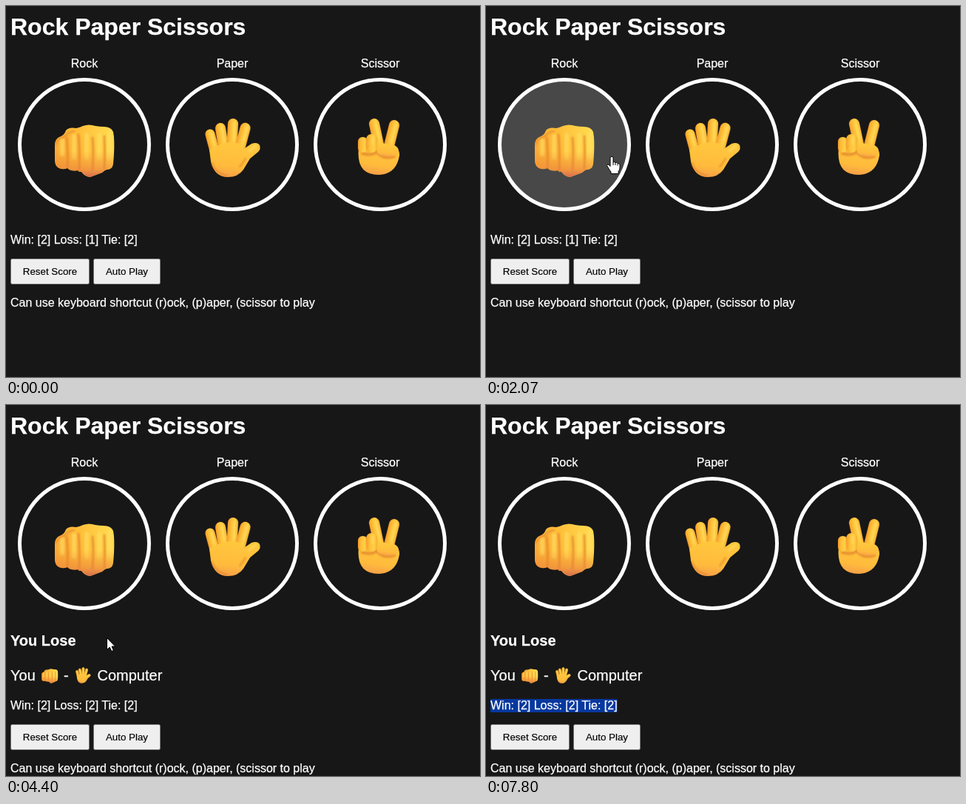
Recreate the animation shown at these times as an HTML page. Size 641 by 501 pixels, loop 8000 ms.

```html
<!DOCTYPE html>
<html lang="en">
<head>
<meta charset="utf-8">
<title>Rock Paper Scissors</title>
<style>
  html, body { margin: 0; width: 100%; height: 100%; overflow: hidden; background: #171717; }
  svg { display: block; width: 641px; height: 501px; font: 16px Arial, "Liberation Sans", sans-serif; }
  text { fill: #fff; stroke: #fff; stroke-width: .25; white-space: pre; }
  .title { font-size: 32px; font-weight: bold; }
  .label { text-anchor: middle; }
  .big { font-size: 20px; }
  .bold { font-weight: bold; }
  .ring { fill: transparent; stroke: #fff; stroke-width: 5; }
  .ring.on { fill: #484848; }
  .button rect { fill: #efefef; stroke: #767676; }
  .button text { fill: #000; stroke: #000; stroke-width: .15; font-size: 13.333px; text-anchor: middle; }
  .finger { fill: url(#finger); stroke: #e98f28; stroke-opacity: .3; stroke-width: .6; }
  .crease { fill: none; stroke: #e07f2c; stroke-linecap: round; stroke-opacity: .7; filter: url(#soft); }
  .shine { fill: none; stroke: #ffe066; stroke-linecap: round; stroke-opacity: .6; filter: url(#soft); }
  .pointer { fill: #fff; stroke: #000; stroke-width: 1; stroke-linejoin: round; }
</style>
</head>
<body>
<svg viewBox="0 0 641 501">
  <defs>
    <linearGradient id="finger">
      <stop offset="0" stop-color="#f6a02c"/>
      <stop offset=".35" stop-color="#ffc03a"/>
      <stop offset=".7" stop-color="#ffd046"/>
      <stop offset="1" stop-color="#f9b233"/>
    </linearGradient>
    <linearGradient id="knuckles" x1="0" y1=".6" x2="1" y2=".4">
      <stop offset="0" stop-color="#f9a936"/>
      <stop offset=".5" stop-color="#ffbf3a"/>
      <stop offset="1" stop-color="#ffda4e"/>
    </linearGradient>
    <linearGradient id="palm" x1=".6" y1="0" x2=".4" y2="1">
      <stop offset="0" stop-color="#ffc83d"/>
      <stop offset=".7" stop-color="#ffbb3c"/>
      <stop offset="1" stop-color="#f6a048"/>
    </linearGradient>
    <linearGradient id="shade" x1="0" y1="0" x2="0" y2="1">
      <stop offset=".5" stop-color="#f08a35" stop-opacity="0"/>
      <stop offset=".85" stop-color="#ea8040" stop-opacity=".6"/>
      <stop offset="1" stop-color="#cf6258" stop-opacity=".9"/>
    </linearGradient>
    <filter id="soft" filterUnits="userSpaceOnUse" x="0" y="100" width="641" height="180">
      <feGaussianBlur stdDeviation="1.2"/>
    </filter>
    <path id="fistShape" d="M66 190Q65 179 74 176Q79 174 81 168Q85 163 95 165Q100 164 104 162Q112 159 121 162Q127 163 132 163Q142 163 145 170Q147 180 146 200L145 213Q144 221 136 221Q133 222 130 225L114 231Q107 231 102 224Q98 224 97 222Q88 224 83 219Q76 222 70 218Q66 215 66 208Z"/>
    <clipPath id="fistClip"><use href="#fistShape"/></clipPath>

    <g id="fist">
      <use href="#fistShape" fill="url(#knuckles)"/>
      <g clip-path="url(#fistClip)">
        <path class="crease" stroke-width="3" d="M82 178Q84 195 83 219M98 174Q100 195 99 222M117 178Q119 195 117 221M133 176Q134 195 133 220"/>
        <path class="shine" stroke-width="6" d="M76 182V200M92 176V205M109 174V205M126 174V205M140 172V205"/>
        <path class="crease" stroke-width="2" d="M67 187Q70 177 80 176Q84 170 92 169"/>
        <use href="#fistShape" fill="url(#shade)"/>
      </g>
    </g>

    <g id="hand">
      <rect class="finger" x="269.5" y="166.5" width="13" height="46" rx="6.5" transform="rotate(-15 276 173)"/>
      <rect class="finger" x="283" y="158" width="14" height="52" rx="7" transform="rotate(-9 290 165)"/>
      <rect class="finger" x="300" y="152" width="14" height="56" rx="7" transform="rotate(3 307 159)"/>
      <rect class="finger" x="316.5" y="158" width="14" height="50" rx="7" transform="rotate(15 324 165)"/>
      <path fill="url(#palm)" d="M275 194L277 210Q282 231 300 231Q314 231 321 221L330 206L341 197Q345 193 343 188Q340 183 332 186L320 194L316 186Q298 180 275 194Z"/>
      <path class="crease" stroke-width="2" d="M279 212Q283 226 299 229M324 206Q320 213 316 217"/>
      <path class="shine" stroke-width="3" d="M278 173L281 186M292 164L295 182M309 158L308 180M326 164L321 182M338 189L328 196"/>
    </g>

    <g id="scissor">
      <rect class="finger" x="491" y="152" width="14" height="46" rx="7" transform="rotate(-12 498 159)"/>
      <rect class="finger" x="518" y="154" width="14" height="46" rx="7" transform="rotate(14 525 161)"/>
      <path fill="url(#palm)" d="M477 192Q473 228 504 228Q528 227 532 202Q533 191 519 187L500 184Z"/>
      <path class="crease" stroke-width="4" d="M482 199Q494 203 501 197Q511 208 525 203"/>
      <rect class="finger" x="476" y="177" width="13" height="21" rx="6"/>
      <rect class="finger" x="487" y="173" width="15" height="25" rx="7"/>
      <path fill="url(#palm)" d="M502 193Q504 187 512 189L525 188Q532 191 531 199Q527 204 516 203Q505 203 502 198Z"/>
      <path class="shine" stroke-width="3" d="M500 158L505 178M527 161L521 182M496 178V186"/>
    </g>
  </defs>

  <text class="title" x="6" y="39">Rock Paper Scissors</text>
  <text class="label" x="106" y="83">Rock</text>
  <text class="label" x="306" y="83">Paper</text>
  <text class="label" x="506" y="83">Scissor</text>
  <circle class="ring" cx="106" cy="187" r="87.5"/>
  <circle class="ring" cx="306" cy="187" r="87.5"/>
  <circle class="ring" cx="506" cy="187" r="87.5"/>
  <use href="#fist"/>
  <use href="#hand"/>
  <use href="#scissor"/>

  <g id="result">
    <text class="big bold" x="6" y="325">You Lose</text>
    <text class="big" x="6" y="372">You</text>
    <use href="#fist" transform="translate(59.2 366) scale(.275) translate(-106 -195.5)"/>
    <text class="big" x="78" y="372">-</text>
    <use href="#hand" transform="translate(104.3 365) scale(.275) translate(-306.5 -191.5)"/>
    <text class="big" x="123.5" y="372">Computer</text>
  </g>

  <g id="lower">
    <rect id="mark" y="307" height="18" fill="#07389f"/>
    <text id="score" x="6" y="321">Win: [2] Loss: [1] Tie: [2]</text>
    <g class="button">
      <rect x="6.5" y="341.5" width="106" height="34" rx="2"/>
      <text x="59.5" y="363">Reset Score</text>
      <rect x="118.5" y="341.5" width="90" height="34" rx="2"/>
      <text x="163.5" y="363">Auto Play</text>
    </g>
    <text x="6" y="406">Can use keyboard shortcut (r)ock, (p)aper, (scissor to play</text>
  </g>

  <g id="cursor" class="pointer">
    <path id="arrow" d="M-.5 -.5V15.5L3.2 12L5.8 17.5L8.4 16.400L6 11H10.600Z"/>
    <g id="grip">
      <path d="M-2 2Q-2 .3 0 .3Q2 .3 2 2V8Q4 6.7 5 8.5Q7 7.5 8 9.5Q10.5 8.7 11 11.5V16Q10.5 19 9 20.5V23.5H-1V21Q-3 18.5 -5 15Q-7.5 12 -5.5 11Q-4 10.5 -2 13.5Z"/>
      <path fill="none" d="M2 8V12M5 8.5V12M8 9.5V12.5"/>
    </g>
  </g>
</svg>
<script>
  const LOOP = 8000, STEP = 200 / 3, CLICK = 3860, DRAG = 6595, LEAVE = 7790;
  const $ = id => document.getElementById(id);
  const rings = [...document.querySelectorAll('.ring')];
  const score = $('score');

  // Pointer path: time, x, y
  const path = [
    [860, 632, 56], [1067, 396, 219], [1200, 262, 248], [1333, 150, 240],
    [1530, 62, 196], [1730, 88, 178], [2067, 170, 203], [2200, 276, 216],
    [2400, 440, 212], [2533, 504, 200], [2867, 504, 200], [3067, 417, 193],
    [3267, 104, 205], [3867, 104, 205], [4067, 112, 262], [4400, 137, 315],
    [4667, 135, 354], [4933, 72, 362], [5133, 22, 371], [5333, 64, 374],
    [5533, 104, 377], [5667, 104, 377], [5867, 57, 370], [6133, 108, 402],
    [6467, 179, 411], [6600, 191, 411], [7333, 41, 411], [7733, 1, 411]
  ];

  function pointerAt(t) {
    if (t >= 195 && t < 395) return [639, 489];
    if (t < path[0][0] || t >= LEAVE) return null;
    const i = path.findIndex(p => p[0] > t);
    if (i < 0) return path[path.length - 1].slice(1);
    const a = path[i - 1], b = path[i], k = (t - a[0]) / (b[0] - a[0]);
    return [1, 2].map(n => Math.round(a[n] + (b[n] - a[n]) * k));
  }

  // Selection runs from the end of the line to the letter nearest x
  function select(x) {
    const last = score.getNumberOfChars() - 1;
    const end = score.getEndPositionOfChar(last).x;
    let left = end;
    for (let i = last; i >= 0; i--) {
      const start = score.getStartPositionOfChar(i).x;
      if (x > (start + left) / 2) break;
      left = start;
    }
    $('mark').setAttribute('x', left);
    $('mark').setAttribute('width', end - left);
  }

  function draw(now) {
    const t = Math.floor((now % LOOP + 5) / STEP) * STEP;
    const played = t >= CLICK, pos = pointerAt(t);
    $('result').style.display = played ? '' : 'none';
    $('lower').setAttribute('transform', `translate(0 ${played ? 90 : 0})`);
    const line = `Win: [2] Loss: [${played ? 2 : 1}] Tie: [2]`;
    if (score.textContent !== line) score.textContent = line;
    select(t < DRAG ? Infinity : pos ? pos[0] : 0);

    let over = false;
    rings.forEach((ring, i) => {
      const on = !!pos && Math.hypot(pos[0] - 106 - i * 200, pos[1] - 187) <= 90;
      ring.classList.toggle('on', on);
      over = over || on;
    });
    $('cursor').style.display = pos ? '' : 'none';
    if (pos) $('cursor').setAttribute('transform', `translate(${pos})`);
    $('arrow').style.display = over ? 'none' : '';
    $('grip').style.display = over ? '' : 'none';
  }

  let begin;
  function tick(now) {
    begin ??= now;
    draw(now - begin);
    requestAnimationFrame(tick);
  }
  draw(0);
  requestAnimationFrame(tick);
</script>
</body>
</html>
```
